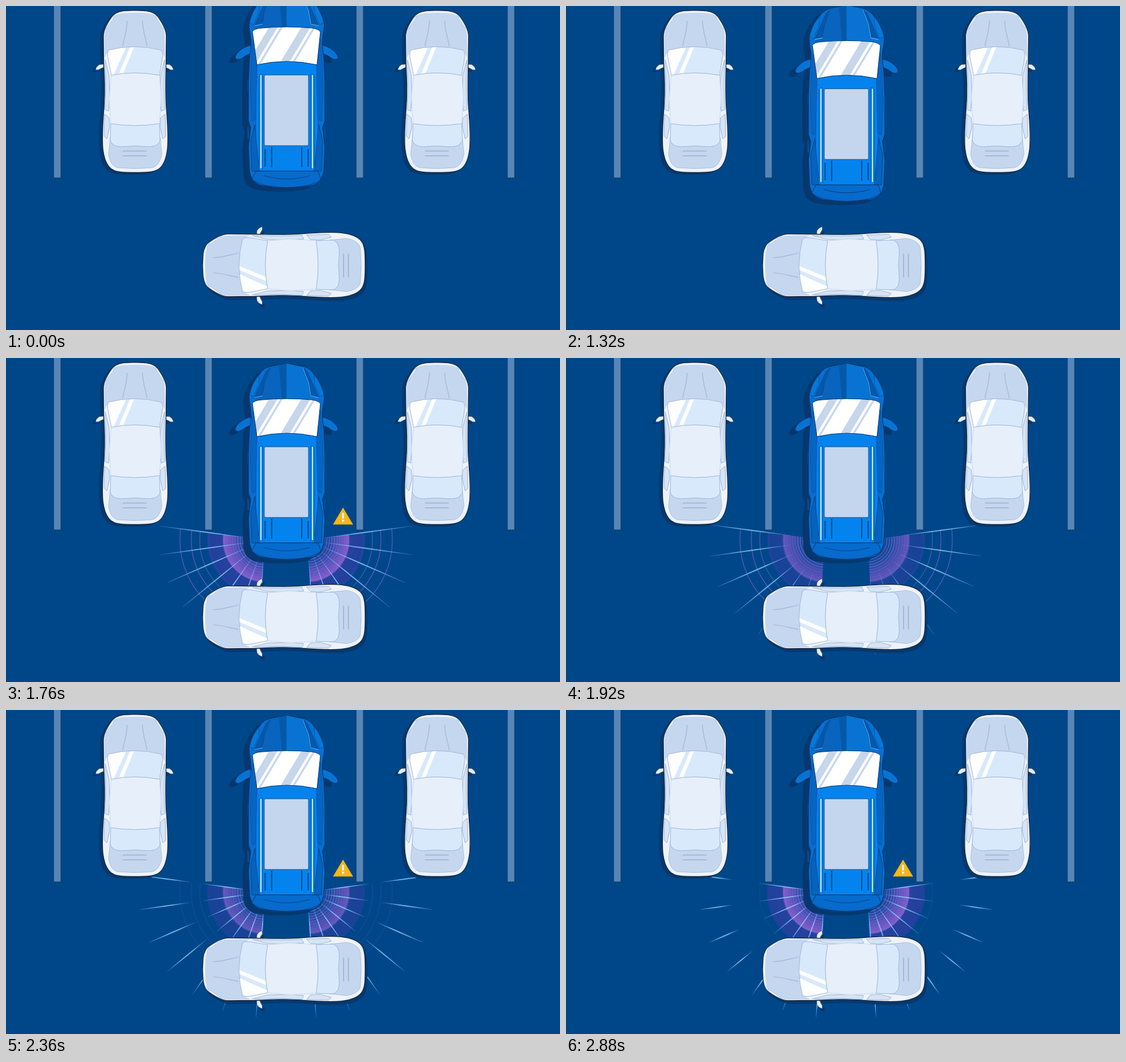
These frames come from a looping animation (978 by 573 pixels, 2.92 s). An HTML page with a canvas:

```html
<!DOCTYPE html>
<html lang="en">
<head>
<meta charset="utf-8">
<title>Parking sensors</title>
<style>
html, body { margin: 0; width: 100%; height: 100%; overflow: hidden; background: #00478a; }
canvas { display: block; }
</style>
</head>
<body>
<canvas id="stage" width="978" height="573"></canvas>
<script>
const ctx = document.getElementById('stage').getContext('2d');
const LOOP = 2920, STEP = 40;
const SHADOW = '#06386f';

const clamp = v => Math.max(0, Math.min(1, v));
const ramp = (t, a, b, from = 0, to = 1) => from + (to - from) * clamp((t - a) / (b - a));
const smooth = p => 0.5 - 0.5 * Math.cos(Math.PI * p);

function shape(d, fill, stroke, width = 1) {
  const p = new Path2D(d);
  if (fill) { ctx.fillStyle = fill; ctx.fill(p); }
  if (stroke) { ctx.strokeStyle = stroke; ctx.lineWidth = width; ctx.stroke(p); }
}

function at(x, y, fn) {
  ctx.save();
  ctx.translate(x, y);
  fn();
  ctx.restore();
}

// Runs fn as is, then flipped about the vertical line x = axis.
function both(axis, fn) {
  fn();
  ctx.save();
  ctx.translate(2 * axis, 0);
  ctx.scale(-1, 1);
  fn();
  ctx.restore();
}

function clipped(d, fn) {
  ctx.save();
  ctx.clip(new Path2D(d));
  fn();
  ctx.restore();
}

// White sedan, nose up, middle at (227, 151)
const SEDAN = {
  body: 'M227 7.5L208 8.5C197 10 190 13 186 20C178 32 172 42 172 54L172.500 100' +
    'C174 130 175 150 173 180C171 205 169 230 171 252C173 270 178 282 186 288C194 294 206 294.500 227 294.500' +
    'C249 294.500 262 294 270 288C278 282 283 270 285 252C287 230 285 205 283 180C281 150 282 130 282.500 100' +
    'L283 54C283 42 277 32 269 20C265 13 258 10 247 8.500Z',
  mirror: 'M172 103L165 103.500Q159 107 158 113L163 113Q168 110 172 108.500Z',
  glass: 'M181 78Q227 66 274 78Q278 84 276 92L271 122.500Q227 114 186 122.500L180 92Q178 84 181 78Z'
};

function sedan() {
  at(-6, 4, () => {
    shape(SEDAN.body, SHADOW);
    both(226.8, () => shape(SEDAN.mirror, SHADOW));
  });
  both(226.8, () => shape(SEDAN.mirror, '#e6effa', '#34506f', 0.7));
  shape(SEDAN.body, '#edf3fb', '#172a40', 1.3);
  shape('M190 18Q196 12 227 12Q259 12 265 18L280 46L281 92L274 78Q227 66 181 78L174 92L174 46Z', '#c4d7ef');
  both(227.5, () => {
    shape('M175 43Q181 27 191 16L189 23Q182 32 175 43Z', '#f6f9fd', '#a9bdd8', 0.8);
    shape('M214 26C214 44 208 57 206 71', null, '#9eb5d4', 1.2);
    shape('M175 95L182 123L183 160L181 186L174.500 183L176 142Z', '#d5e4f7', '#9fb6d5');
    shape('M174 191L182 198L183 214L178 235L173 230Z', '#d5e4f7', '#9fb6d5');
  });
  shape('M186 122Q227 114 271 122L274 162L271 209Q227 214 185 209L182 162Z', '#e6effa', '#bdcee5', 0.7);
  shape('M184 232L181 262Q184 283 197 286Q227 289 258 286Q271 283 275 262L272 232Z', '#c5d7ee', '#9fb6d5', 0.8);
  shape('M185 208Q227 215 271 208L272 238Q269 248 253 249Q227 246 203 249Q187 248 184 238Z', '#d9e9fc', '#9fb6d5');
  shape('M206 256.500H248M206 265H248', null, '#a2b8d7', 2);
  shape(SEDAN.glass, '#d9e9fc');
  clipped(SEDAN.glass, () => {
    shape('M175 70H213L189 124H175Z', '#fff');
    shape('M220 70H227L205 124H198Z', '#fff');
  });
  shape(SEDAN.glass, null, '#9fb6d5');
}

// Blue SUV in its final place, axis x = 495.5
const SUV = {
  body: 'M495.500 9L466 15Q453 19 447 29Q432 48 429 68L430 80C434 96 433 108 430 126L428 170L428 238' +
    'L432 250L428 284L430 328L434 341Q440 350 453 353Q495 360 538 353Q551 350 557 341L561 328L563 284' +
    'L559 250L563 238L563 170L561 126C558 108 557 96 561 80L562 68Q559 48 544 29Q538 19 525 15Z',
  mirror: 'M434 104Q425 106 418 110Q405 119 404.500 127Q409 132 417 127Q425 120 437 118Z',
  glass: 'M435 80Q438 75 452 74Q495 70 540 74Q553 76 555 81L549 139Q495 127 443 139Z'
};

function suv() {
  const edge = '#08376f';
  at(-11, 7, () => {
    shape(SUV.body, SHADOW);
    both(495.5, () => shape(SUV.mirror, SHADOW));
  });
  both(495.5, () => {
    shape('M428 165H426V186H428M428 248H426V270H429', '#07529f', edge, 0.8);
    shape(SUV.mirror, '#0873d5', edge);
  });
  shape(SUV.body, '#0670d2', edge, 1.3);
  // hood
  shape('M495.500 10L467 16L449 44L439 75Q470 70 495.500 72Z', '#0864bd');
  shape('M482 13L495.500 10V72L487 72Z', '#0757a8');
  shape('M495.500 10L524 16L542 44L552 75Q520 70 495.500 72Z', '#0873d2');
  both(495.5, () => {
    shape('M466 17L459 24L439 70L452 67L456 45Z', '#0758aa', '#08468d', 0.8);
    shape('M447 30Q435 43 430 65L437 68L446 47Z', '#0878d8', '#07509c', 0.7);
    shape('M439 70L453 67', null, '#67b4f3', 1.2);
  });
  shape('M524 17L534 43L538 66', null, '#58a8ea', 1);
  // roof and flanks
  shape('M443 139Q495 127 549 139L551 200V327H441V200Z', '#0483ef', '#08509f');
  both(495.5, () => {
    shape('M436 93L443 139L441 235L434 239L431 180L433 130Z', '#0765c1', '#07509c', 0.7);
    shape('M439 245L432 274L434 327L447 327L442 275Z', '#0663bd', edge, 0.7);
    shape('M446.500 324V160Q447 155 453 155V324', null, '#075eb5', 1);
    shape('M450 157V322', null, '#d9eafd', 2);
    shape('M457.500 288V319M469 284V320', null, '#074483', 2);
  });
  shape('M458 157H532Q534 157 534 159V280Q534 282 532 282H458Q456 282 456 280V159Q456 157 458 157Z', '#c4d6ee', '#23517f');
  shape('M441 327H551L556 341Q543 355 495 356Q448 355 434 341Z', '#066bcc', edge);
  shape('M455 335Q495 347 537 335', null, '#07478e', 1.2);
  // windshield
  shape(SUV.glass, '#fff');
  clipped(SUV.glass, () => {
    for (const [a, b] of [[466, 481], [486, 490], [523, 539], [544, 548]]) {
      shape(`M${a} 70H${b}L${b - 42} 140H${a - 42}Z`, '#c6d6eb');
    }
  });
  shape(SUV.glass, null, edge);
}

// Sensor field, left side, around (457, 322)
const CX = 457, CY = 322, RAYS = 7, SPREAD = 15.6, FIRST = -7.6;
const rad = deg => (180 - deg) * Math.PI / 180;
const A0 = rad(FIRST + SPREAD * (RAYS - 1)), A1 = rad(FIRST);

function arc(r, color, width = 1, dash = []) {
  ctx.strokeStyle = color;
  ctx.lineWidth = width;
  ctx.setLineDash(dash);
  ctx.beginPath();
  ctx.arc(0, 0, r, A0, A1);
  ctx.stroke();
  ctx.setLineDash([]);
}

function sector(r, stops) {
  const g = ctx.createRadialGradient(0, 0, 0, 0, 0, r);
  stops.forEach(([p, c]) => g.addColorStop(p, c));
  ctx.fillStyle = g;
  ctx.beginPath();
  ctx.moveTo(0, 0);
  ctx.arc(0, 0, r, A0, A1);
  ctx.fill();
}

function rays(from, to) {
  if (to - from < 2) return;
  for (let i = 0; i < RAYS; i++) {
    ctx.save();
    ctx.rotate(rad(FIRST + SPREAD * i));
    const g = ctx.createLinearGradient(from, 0, to, 0);
    g.addColorStop(0, 'rgba(120,195,245,.15)');
    g.addColorStop(0.35, 'rgba(140,208,250,.85)');
    g.addColorStop(0.7, 'rgba(125,195,240,.8)');
    g.addColorStop(1, 'rgba(110,180,230,.35)');
    ctx.fillStyle = g;
    ctx.beginPath();
    ctx.moveTo(from, -0.4);
    ctx.lineTo((from + to) / 2, -1);
    ctx.lineTo(to, -0.3);
    ctx.lineTo(to, 0.3);
    ctx.lineTo((from + to) / 2, 1);
    ctx.lineTo(from, 0.4);
    ctx.fill();
    ctx.restore();
  }
}

function sensor(t) {
  const glow = t < 2040 ? ramp(t, 1480, 1680) * ramp(t, 1860, 2060, 1, 0) : ramp(t, 2200, 2420);
  const mesh = t < 2040 ? ramp(t, 1440, 1560, 30, 76) : ramp(t, 2040, 2320, 54, 76);
  const rings = ramp(t, 1480, 1600) * ramp(t, 2080, 2440, 1, 0);

  ctx.globalAlpha = glow;
  sector(102, [[0, 'rgba(45,60,165,.3)'], [0.7, 'rgba(62,62,172,.6)'], [1, 'rgba(52,60,166,.62)']]);
  sector(74, [[0, 'rgba(60,80,190,0)'], [0.5, 'rgba(85,80,190,.2)'], [0.72, 'rgba(125,90,205,.6)'], [1, 'rgba(150,98,212,.86)']]);
  arc(115, 'rgba(95,90,195,.6)', 1, [1, 2]);

  ctx.globalAlpha = rings;
  arc(150, 'rgba(115,92,205,.85)', 1.2);
  arc(130, 'rgba(115,92,205,.85)', 1.2);
  arc(115, 'rgba(110,105,210,.75)');
  arc(99, 'rgba(100,120,215,.6)', 1, [1, 2]);

  ctx.globalAlpha = 1;
  for (let r = 30; r <= mesh; r += 4.5) {
    arc(r, `rgba(130,175,240,${r < 58 ? 0.55 : 0.25})`, 0.9, r < 50 ? [] : [1.5, 1.5]);
  }

  const far = t < 1760 ? ramp(t, 1440, 1520, 28, 187) : ramp(t, 1760, 2080, 187, 222);
  const near = t < 2080 ? ramp(t, 1760, 2080, 28, 95) : ramp(t, 2080, 2600, 95, 165);
  rays(near, far);
  if (t >= 2040) rays(28, ramp(t, 2080, 2400, 57, 117));
}

function warning() {
  shape('M595 266.500L611 293.500H579Z', '#fcb514', '#fcb514', 2);
  shape('M593 274H597L596.300 284H593.700Z', '#fff');
  shape('M593.200 286H596.800V289.500H593.200Z', '#fff');
}

function draw(t) {
  ctx.fillStyle = '#00478a';
  ctx.fillRect(0, 0, 978, 573);
  for (let i = 0; i < 4; i++) {
    shape(`M${84 + 267 * i} -2h13v306h-13Z`, '#5686b8', '#123760', 1.2);
  }
  if (t >= 1440) both(494.5, () => at(CX, CY, () => sensor(t)));

  sedan();
  at(533.5, 0, sedan);
  at(490.5, 459, () => {
    ctx.rotate(-Math.PI / 2);
    ctx.translate(-227, -151);
    sedan();
  });
  at(0, -35 * (1 - smooth(ramp(t, 1000, 1510))), suv);

  if (t >= 1600 && (t - 1600) % 600 < 300) warning();
}

const start = performance.now();
function tick() {
  const t = (performance.now() - start) % LOOP;
  draw(Math.floor(t / STEP) * STEP);
  requestAnimationFrame(tick);
}
tick();
</script>
</body>
</html>
```
